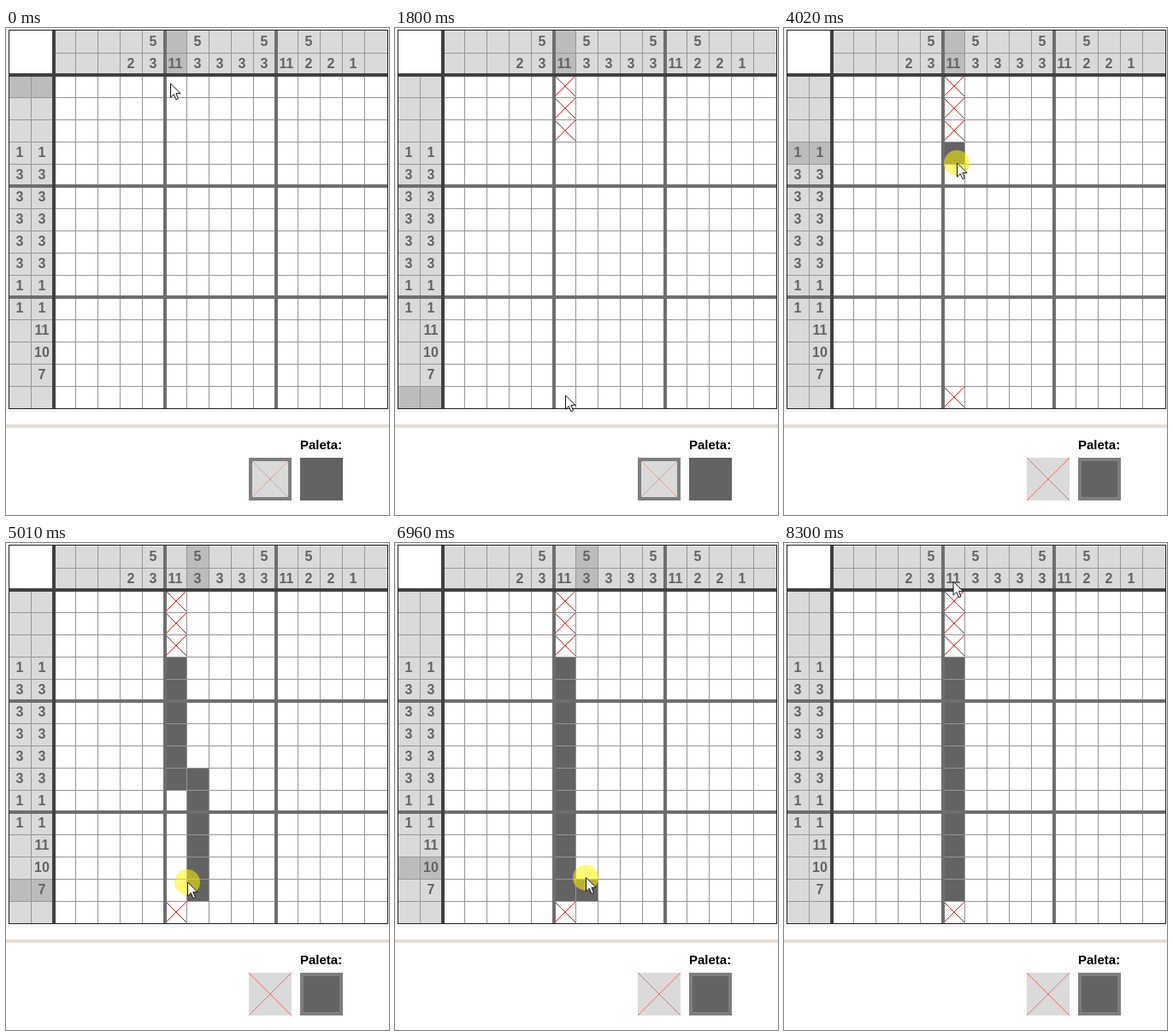
Animation of 448x570 px, one loop 9050 ms. Source, as an HTML page:

```html
<!DOCTYPE html>
<html lang="es">
<head>
<meta charset="utf-8">
<title>Nonograma</title>
<style>
  html, body { margin: 0; width: 100%; height: 100%; overflow: hidden; background: #fff; }
  svg { display: block; }
  text { font: bold 16px "Liberation Sans", Arial, sans-serif; fill: #636363; text-anchor: middle; }
  .label { font-size: 15px; fill: #000; text-anchor: start; }
  .crisp { shape-rendering: crispEdges; }
  .cross { fill: none; stroke: #e01c1c; }
  .cross.under { stroke: #444; }
</style>
</head>
<body>
<svg width="448" height="570" viewBox="0 0 448 570">
  <g class="crisp">
    <rect width="448" height="450" fill="#f4f4f4"/>
    <rect y="450" width="448" height="120" fill="#fff"/>
    <rect y="464" width="448" height="4" fill="#e3dcd5"/>
    <rect x="3" y="2" width="444" height="444" fill="#dadada"/>
    <rect x="56" y="55" width="390" height="390" fill="#fff"/>
    <path id="hover" fill="#bcbcbc"/>
    <path id="filled" fill="#636363"/>
  </g>
  <g id="clues"></g>
  <path id="crossUnder" class="cross under"/>
  <path id="crossTop" class="cross"/>
  <g class="crisp">
    <path id="thin" stroke="#969696"/>
    <path id="thick" stroke="#6e6e6e" stroke-width="4"/>
    <rect x="4" y="3" width="51" height="51" fill="#fff"/>
    <path d="M56 2V446M3 55H447" stroke="#404040" stroke-width="4"/>
    <rect x="3.5" y="2.5" width="443" height="443" fill="none" stroke="#222"/>
  </g>
  <text class="label" x="344" y="493">Paleta:</text>
  <g class="crisp">
    <rect x="284" y="503" width="50" height="50" fill="#dadada"/>
    <rect x="344" y="503" width="50" height="50" fill="#636363"/>
  </g>
  <path id="swatchCross" d="M284 503l50 50M334 503l-50 50"/>
  <rect id="frame" y="505" width="46" height="46" fill="none" stroke="#7e7e7e" stroke-width="4"/>
  <circle id="press" r="15" fill="#fff400" fill-opacity=".55"/>
  <path id="cursor" d="M0 0V16.2L3.8 12.6L6.4 18.7L9 17.6L6.4 11.6H11.6Z" fill="#fff" stroke="#111"/>
</svg>
<script>
const LOOP = 9050, SIZE = 26, EDGE = 55, COUNT = 15;
const HOVER_LAG = 40, SETTLE = 60;
const columns = ',,,2,5 3,11,5 3,3,3,5 3,11,5 2,2,1,';
const rows = ',,,1 1,3 3,3 3,3 3,3 3,3 3,1 1,1 1,11,10,7,';

// The pointer glides to `from` by `arrive`, then drags to `to` while pressed.
const strokes = [
  { arrive: 0, press: 40, release: 740, from: [192, 65], to: [197, 121], tool: 'cross' },
  { arrive: 1800, press: 2080, release: 2200, from: [199, 430], tool: 'cross' },
  { arrive: 2960, press: 2960, release: 3110, from: [359, 534] },
  { arrive: 3930, press: 4020, release: 5040, from: [202, 158], to: [212, 397], tool: 'fill' },
  { arrive: 5090, press: 5270, release: 5800, from: [210, 399], to: [203, 299], tool: 'fill' },
  { arrive: 6170, press: 6260, release: 7080, from: [223, 269], to: [223, 403], tool: 'fill' },
  { arrive: 7890, press: 8200, release: 8300, from: [197.5, 45] }
];
const darkAt = strokes[2].release, headerAt = strokes[6].release;

const $ = id => document.getElementById(id);
const set = (id, name, value) => $(id).setAttribute(name, value);
const mix = (a, b, p) => a + (b - a) * p;
const progress = (t, from, to) => Math.min(1, Math.max(0, (t - from) / (to - from)));
const easeOut = (p, power) => 1 - (1 - p) ** power;
const end = s => s.to || s.from;
const line = i => EDGE + SIZE * i;

function pointer(t) {
  const i = strokes.findLastIndex(s => t >= s.press);
  const s = strokes[i], next = strokes[i + 1];
  if (!s) return next.from;
  if (t < s.release) {
    const p = progress(t, s.press + SETTLE, s.release - SETTLE);
    return [mix(s.from[0], end(s)[0], easeOut(p, 4)), mix(s.from[1], end(s)[1], p)];
  }
  if (!next) return end(s);
  const p = easeOut(progress(t, s.release, next.arrive), 1.7);
  return end(s).map((v, axis) => mix(v, next.from[axis], p));
}

function cellAt(t) {
  const cell = pointer(t).map(v => Math.floor((v - EDGE - 0.5) / SIZE));
  return cell.every(v => v >= 0 && v < COUNT) ? cell : null;
}

// Replays every drag once; starting on a painted cell erases.
function recordEdits() {
  const edits = [], state = {};
  for (const { press, release, tool } of strokes.filter(s => s.tool)) {
    let value, last;
    for (let t = press; t < release; t += 2) {
      const key = String(cellAt(t));
      if (key === last) continue;
      value = value || (state[key] === tool ? 'empty' : tool);
      state[key] = value;
      edits.push({ t, key, value });
      last = key;
    }
  }
  edits.push({ t: headerAt, key: '5,-1', value: 'cross' });
  return edits;
}
const edits = recordEdits();

function drawBoard() {
  let thin = '', thick = '';
  for (let i = -1; i < COUNT; i++) {
    const at = line(i);
    if (i % 5) thin += `M${at + .5} 2V446M3 ${at + .5}H447`;
    else thick += `M${at + 1} 2V446M3 ${at}H447`;
  }
  set('thin', 'd', thin);
  set('thick', 'd', thick);

  const clue = (n, col, row) => `<text x="${line(col) + 13}" y="${line(row) + 18}">${n}</text>`;
  const clues = (text, place) => text.split(',').map((group, i) =>
    group.split(' ').map((n, k, list) => place(n, i, k - list.length)).join('')).join('');
  $('clues').innerHTML =
    clues(columns, (n, i, slot) => clue(n, i, slot)) +
    clues(rows, (n, i, slot) => clue(n, slot, i));
}

function render(t) {
  const [x, y] = pointer(t);
  set('cursor', 'transform', `translate(${x + .5} ${y})`);

  const down = strokes.some(s => t >= s.press && t < s.release);
  set('press', 'visibility', down ? 'visible' : 'hidden');
  set('press', 'cx', x);
  set('press', 'cy', y);

  const over = cellAt(t - HOVER_LAG);
  set('hover', 'd', over ? `M${line(over[0])} 3h26v51h-26zM4 ${line(over[1])}h51v26h-51z` : '');

  const cells = {};
  for (const e of edits) if (e.t <= t) cells[e.key] = e.value;
  let filled = '', under = '', top = '';
  for (const key in cells) {
    const [cx, cy] = key.split(',').map(line);
    if (cells[key] === 'fill') filled += `M${cx} ${cy}h26v26h-26z`;
    if (cells[key] === 'cross') {
      under += `M${cx + 1} ${cy}l26 26`;
      top += `M${cx + 27} ${cy}l-26 26M${cx + 7} ${cy + 6}l14 14`;
    }
  }
  set('filled', 'd', filled);
  set('crossUnder', 'd', under);
  set('crossTop', 'd', top);

  const dark = t >= darkAt;
  set('frame', 'x', dark ? 346 : 286);
  set('swatchCross', 'stroke', dark ? '#f56b6b' : '#d9a285');
}

function tick(now) {
  render(now % LOOP);
  requestAnimationFrame(tick);
}

drawBoard();
render(0);
requestAnimationFrame(tick);
</script>
</body>
</html>
```
